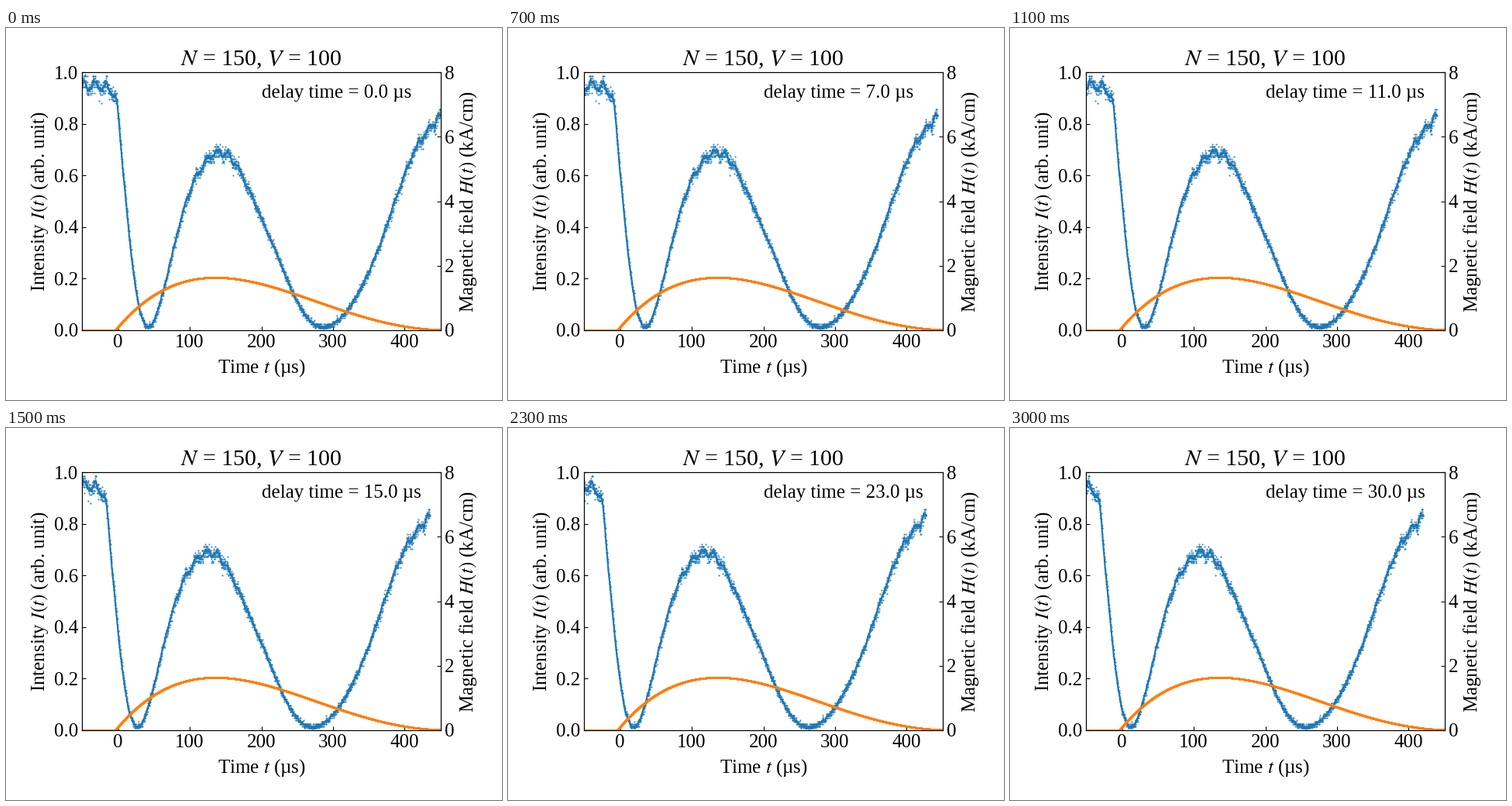
Write a matplotlib script that moves like this. It is 640 px wide and 480 px high and loops after 3.1 s.

```python
import numpy as np
import matplotlib.pyplot as plt
from matplotlib.animation import FuncAnimation

plt.rcParams.update({
    "font.family": "Liberation Serif",
    "font.size": 18,
    "mathtext.fontset": "stix",
    "xtick.direction": "in",
    "ytick.direction": "in",
})

FRAMES, INTERVAL = 31, 100

# Optical phase in quarter turns at a few key times (microseconds)
PHASE = [(-60, .03), (-14, .08), (-4, .15), (7, .405), (23, .71), (42, 1),
         (79, 1.4), (137, 1.646), (205, 1.446), (286, 1), (362, .62),
         (416, .34), (450, .23)]


def hermite(t, points):
    """Smooth cubic curve through the points."""
    x, y = np.array(points, float).T
    m = np.gradient(y, x)
    i = np.clip(np.searchsorted(x, t, side="right") - 1, 0, len(x) - 2)
    h = x[i + 1] - x[i]
    s = (t - x[i]) / h
    return ((1 + 2 * s) * (1 - s) ** 2 * y[i]
            + s * (1 - s) ** 2 * h * m[i]
            + s * s * (3 - 2 * s) * y[i + 1]
            + s * s * (s - 1) * h * m[i + 1])


def moving_average(y, width):
    padded = np.pad(y, width // 2, mode="edge")
    return np.convolve(padded, np.ones(width) / width, mode="valid")


def intensity(t):
    """Light through crossed polarizers, with a ripple where it is bright."""
    base = 0.013 + 0.935 * np.cos(np.pi / 2 * hermite(t, PHASE)) ** 2
    return base + 0.02 * base ** 2 * np.cos(2 * np.pi * (t + 32) / 15.5)


def magnetic_field(t):
    """Pulse that rises linearly and dies out smoothly."""
    u = np.clip((t + 4) / 480, 0, 1)
    return 8 * 1.623 * u * (1 - u) ** 2.43


rng = np.random.default_rng(4)
time = np.arange(-60, 450.01, 0.2)
mean = intensity(time)
noisy = mean + rng.normal(size=time.size) * (0.006 + 0.010 * mean)
step = 0.008  # digitizer resolution
samples = np.clip(np.round(noisy / step) * step, 0, 1)
trend = moving_average(noisy, 11)

fig = plt.figure(figsize=(6.4, 4.8), dpi=100)
ax = fig.add_axes([0.15375, 0.1875, 0.7223, 0.6935])
ax.set_title("$N$ = 150, $V$ = 100")
ax.set_xlabel("Time $t$ (µs)", labelpad=5.8)
ax.set_ylabel("Intensity $I(t)$ (arb. unit)")
ax.set_xlim(-50, 450)
ax.set_ylim(0, 1)
ax.set_xticks(range(0, 500, 100))

twin = ax.twinx()
twin.set_ylabel("Magnetic field $H(t)$ (kA/cm)")
twin.set_ylim(0, 8)
twin.set_yticks(range(0, 10, 2))

dots, = ax.plot([], [], ".", ms=1, color="C0")
line, = ax.plot([], [], lw=1.5, color="C0")
twin.plot(time, magnetic_field(time), ".", ms=2, color="C1")
label = ax.text(200, 0.9, "")


def update(delay):
    dots.set_data(time - delay, samples)
    line.set_data(time - delay, trend)
    label.set_text(f"delay time = {delay:.1f} µs")
    return dots, line, label


anim = FuncAnimation(fig, update, frames=FRAMES, interval=INTERVAL,
                     repeat=True, repeat_delay=0)
plt.show()
```
